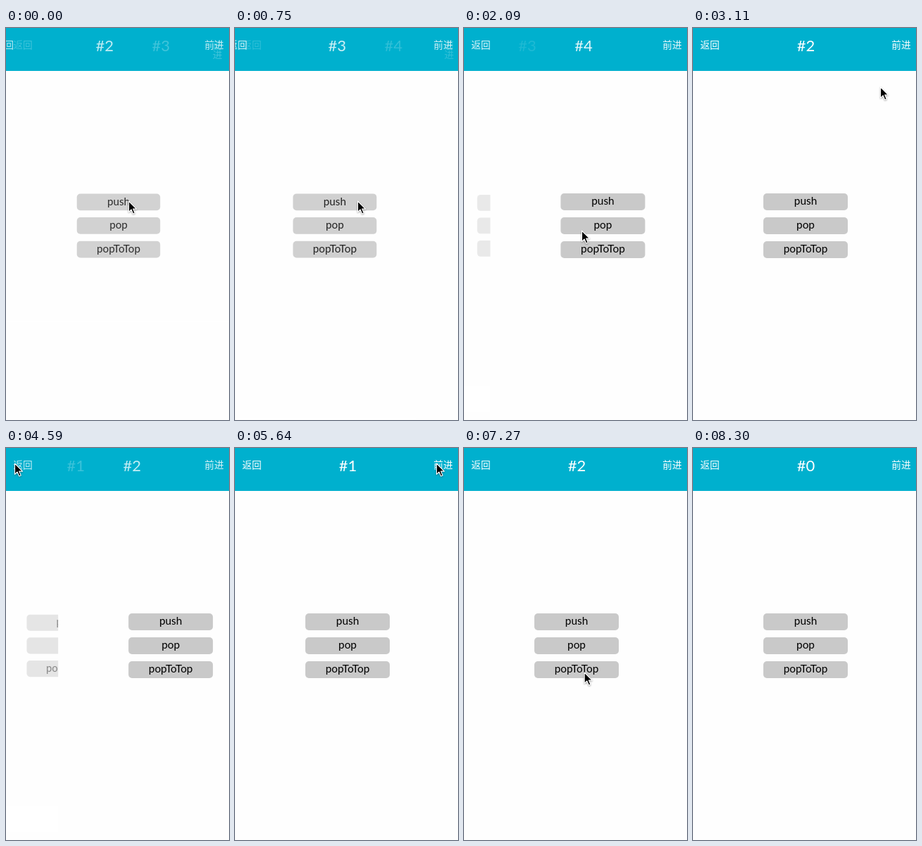
Recreate the animation shown at these times as an HTML page. Size 317 by 557 pixels, loop 8.92 s.

```html
<!DOCTYPE html>
<html lang="zh">
<head>
<meta charset="utf-8">
<title>Navigation demo</title>
<style>
  html, body { margin: 0; width: 100%; height: 100%; overflow: hidden; background: #fefefe; }
  svg { display: block; width: 317px; height: 557px; }
  text { text-anchor: middle; }
  .page text { font: 15.4px Lato, "Open Sans", sans-serif; fill: #000; }
  .nav text { font: 500 13.7px "Noto Sans CJK SC", "Noto Sans CJK", sans-serif; fill: #fff; }
  .nav .title { font: 22px Lato, "Open Sans", sans-serif; }
  #cursor { filter: drop-shadow(0 1px 1px rgba(0, 0, 0, .35)); }
</style>
</head>
<body>
<svg id="stage" viewBox="0 0 317 557">
  <rect width="317" height="557" fill="#fefefe"/>
  <g id="pages"></g>
  <rect width="317" height="61" fill="#00b0ce"/>
  <g id="bars"></g>
  <path id="cursor" d="M0 0V15.4L3.6 12L6.2 18L8.7 17L6.2 11.1H11Z"
        fill="#000" stroke="#fff" stroke-width="1.1" stroke-linejoin="round"/>
</svg>
<script>
const LOOP = 8920, STEP = 148.4, LAST_STEP = 56;
const W = 317, H = 557, PUSH = 400, POP = 270;

// start, duration, from, to, axis
const moves = [
  [-139, PUSH, 2, 3, 'y'],
  [621, PUSH, 3, 4, 'x'],
  [2013, POP, 4, 3, 'x'],
  [2516, POP, 3, 2, 'y'],
  [4510, POP, 2, 1, 'x'],
  [5676, PUSH, 1, 2, 'x'],
  [7487, POP, 2, 0, 'x']
];

// time, x, y
const pointer = [
  [0, 174, 246], [1040, 174, 246], [1790, 167, 288], [2600, 167, 288],
  [2968, 180, 304], [3116, 266, 84], [3420, 294, 20], [3600, 290, 22],
  [4155, 7, 20], [4300, 12, 22], [4650, 12, 22], [5190, 293, 22],
  [5400, 286, 22], [6380, 286, 22], [7120, 171, 319], [7600, 170, 319],
  [8162, 236, 474]
];
const POINTER_GONE = 8200;

const $ = id => document.getElementById(id);

function add(parent, tag, attrs, content = '') {
  const el = document.createElementNS('http://www.w3.org/2000/svg', tag);
  for (const key in attrs) el.setAttribute(key, attrs[key]);
  el.textContent = content;
  return parent.appendChild(el);
}

function place(el, x, y, opacity = 1, scale = 1) {
  el.setAttribute('transform',
    `translate(${x + W / 2 * (1 - scale)} ${y + H / 2 * (1 - scale)}) scale(${scale})`);
  el.setAttribute('opacity', opacity);
}

function makePage() {
  const g = add($('pages'), 'g', { class: 'page' });
  add(g, 'rect', { width: W, height: H, fill: '#fefefe' });
  ['push', 'pop', 'popToTop'].forEach((label, i) => {
    const y = 235 + 34 * i;
    add(g, 'rect', { x: 100, y, width: 120, height: 24, rx: 5, fill: '#c9c9c9' });
    add(g, 'text', { x: 160, y: y + 16.3 }, label);
  });
  return g;
}

function makeBar() {
  const g = add($('bars'), 'g', { class: 'nav' });
  const right = add(g, 'g', {});
  return {
    title: add(g, 'text', { class: 'title', x: 160.5, y: 33 }),
    left: add(g, 'text', { x: 24, y: 29 }, '返回'),
    right,
    line: add(right, 'text', { x: 296, y: 29 }, '前进'),
    upper: add(right, 'text', { x: 296, y: 29 }, '前'),
    lower: add(right, 'text', { x: 296, y: 43 }, '进')
  };
}

const under = makePage(), over = makePage();
const underBar = makeBar(), overBar = makeBar();

// Cubic ease-in-out with control points (.42, 0) and (.58, 1)
function ease(x) {
  if (x <= 0) return 0;
  if (x >= 1) return 1;
  let lo = 0, hi = 1, u = .5;
  for (let i = 0; i < 24; i++) {
    u = (lo + hi) / 2;
    const v = 1 - u;
    if (3 * u * v * (.42 * v + .58 * u) + u ** 3 < x) lo = u; else hi = u;
  }
  return u * u * (3 - 2 * u);
}

function setBar(bar, index, slide, leftShift, opacity, rightShift, stacked) {
  bar.title.textContent = '#' + index;
  place(bar.title, slide, 0, opacity);
  place(bar.left, leftShift, 0, opacity);
  place(bar.right, rightShift, 0, opacity);
  bar.line.setAttribute('visibility', stacked ? 'hidden' : 'visible');
  for (const part of [bar.upper, bar.lower])
    part.setAttribute('visibility', stacked ? 'visible' : 'hidden');
}

function drawPages(t) {
  const [start, span, from, to, axis] = moves.filter(m => m[0] <= t).pop();
  const k = ease((t - start) / span);
  const p = to > from ? k : 1 - k;
  const away = 1 - p;
  const low = Math.min(from, to), high = Math.max(from, to);

  place(under, axis === 'x' ? -95 * p : 0, 0, 1 - .7 * p, 1 - .05 * p);
  place(over, axis === 'x' ? W * away : 0, axis === 'y' ? H * away : 0, p > 0 ? 1 : 0);

  // The incoming right label wraps while its box is still narrow
  const squeeze = Math.max(0, 5 + 62 * (.244 - p));
  setBar(underBar, low, -80 * p, -106 * p, away, 0, false);
  setBar(overBar, high, 80 * away, 0, p, squeeze, squeeze > 0);
}

function drawPointer(t) {
  const next = pointer.findIndex(key => key[0] > t);
  const b = pointer[next < 0 ? pointer.length - 1 : next];
  const a = next < 0 ? b : pointer[next - 1];
  const k = a === b ? 0 : (t - a[0]) / (b[0] - a[0]);
  const x = a[1] + (b[1] - a[1]) * k, y = a[2] + (b[2] - a[2]) * k;
  $('cursor').setAttribute('transform', `translate(${x + .5} ${y})`);
  $('cursor').setAttribute('visibility', t < POINTER_GONE ? 'visible' : 'hidden');
}

function render(now) {
  const step = Math.min(LAST_STEP, Math.floor((now % LOOP + 12) / STEP));
  drawPages(step * STEP);
  drawPointer(step * STEP);
}

const begin = performance.now();
function tick() {
  render(performance.now() - begin);
  requestAnimationFrame(tick);
}
tick();
</script>
</body>
</html>
```
